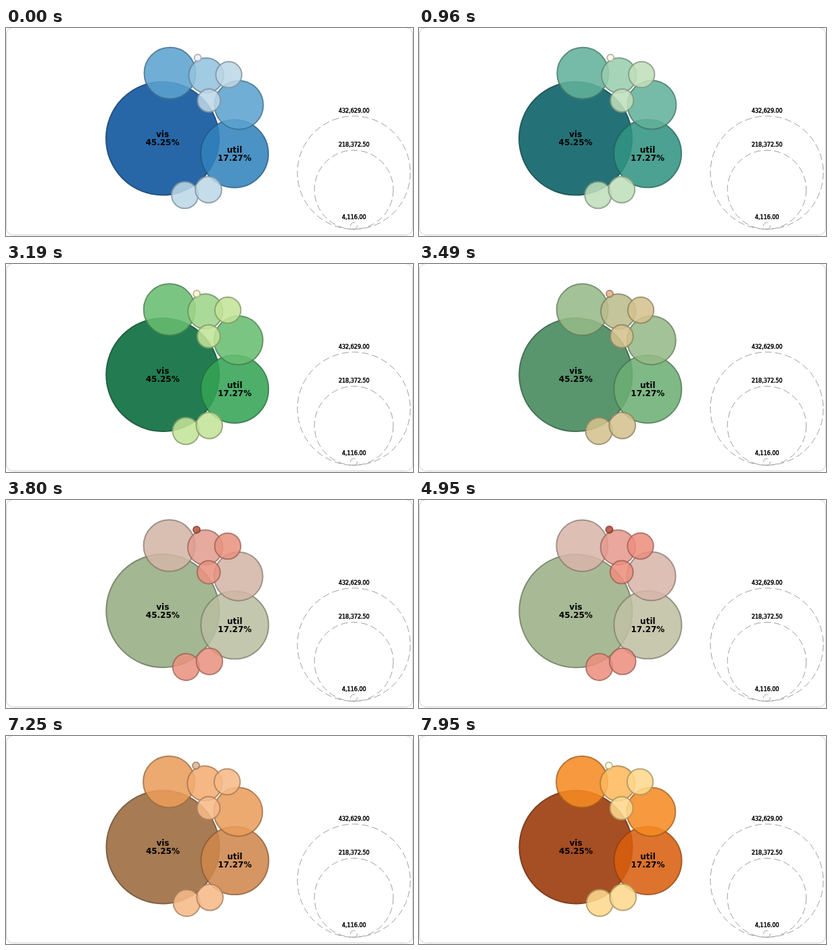
Write an HTML page that moves like this. It is 602 by 307 pixels and loops after 8000 ms.

```html
<!DOCTYPE html>
<html lang="en">
<head>
<meta charset="utf-8">
<title>Bubble chart palettes</title>
<style>
  html, body { margin: 0; width: 100%; height: 100%; overflow: hidden; background: #fff; }
  svg { display: block; width: 602px; height: 307px; }
  text { font-family: "DejaVu Sans", sans-serif; text-anchor: middle; fill: #000; }
  .frame { fill: #fff; stroke: #ccc; }
  .bubble { opacity: .87; stroke-width: 2; }
  .label { font-size: 12px; font-weight: bold; }
  .legend circle { fill: none; stroke: #9a9ea6; stroke-dasharray: 10 5; }
  .legend text { font-size: 8px; stroke: #000; stroke-width: .5; }
</style>
</head>
<body>
<svg viewBox="0 0 602 307">
  <rect class="frame" x=".5" y="-.5" width="601" height="306" rx="10"/>
  <g id="bubbles"></g>
  <g id="labels"></g>
  <g id="legend" class="legend"></g>
</svg>
<script>
const LOOP = 8000, DRIFT_START = 500, TICK = 76.7, FADE = 1000;

// Each palette runs from the largest bubble's shade to the smallest's.
const parse = hex => [0, 2, 4].map(i => parseInt(hex.slice(i, i + 2), 16));
const palette = list => list.split(' ').map(parse);
const blues = palette('08519c 3182bd 5ca3d0 94c3df bdd7e7 eff3ff');
const fades = [
  { start: 440, colors: palette('006837 31a354 66bd70 9dd689 c2e699 ffffcc') },
  { start: 3020, colors: palette('9cb086 c0c0a4 d8b6aa e69b90 ec8f7f b84d38') },
  { start: 6720, colors: palette('993404 d95f0e f68b22 feb95c fed98e ffffd4') }
];

// Start and end centre, radius, palette slot, label lines.
const bubbles = [
  { from: [231.5, 163], to: [232, 164], r: 83.5, shade: 0, lines: ['vis', '45.25%'] },
  { from: [338, 185.5], to: [338.5, 184], r: 50, shade: 1, lines: ['util', '17.27%'] },
  { from: [242.5, 66.7], to: [241, 67.7], r: 38, shade: 2 },
  { from: [344.5, 113.7], to: [343.3, 112], r: 36, shade: 2 },
  { from: [296, 70], to: [293.8, 70], r: 25.7, shade: 3 },
  { from: [329.5, 69], to: [327, 67.6], r: 19.2, shade: 4 },
  { from: [300.3, 107], to: [299.5, 106.4], r: 17, shade: 4 },
  { from: [264.6, 246.6], to: [267.4, 246.4], r: 19.7, shade: 4 },
  { from: [299.5, 238.7], to: [301.7, 238], r: 19.4, shade: 4 },
  { from: [283.6, 44], to: [280.9, 43.8], r: 5, shade: 5 }
];
const legend = [[83.5, '432,629.00'], [58.3, '218,372.50'], [5, '4,116.00']];

function add(parent, tag, attrs, text = '') {
  const node = document.createElementNS('http://www.w3.org/2000/svg', tag);
  setAttrs(node, attrs);
  node.textContent = text;
  return document.getElementById(parent).appendChild(node);
}
function setAttrs(node, attrs) {
  for (const key in attrs) node.setAttribute(key, attrs[key]);
}

for (const [r, text] of legend) {
  add('legend', 'circle', { cx: 514.5, cy: 297 - r, r });
  add('legend', 'text', { x: 514.8, y: 292 - 2 * r }, text);
}
for (const b of bubbles) {
  b.circle = add('bubbles', 'circle', { class: 'bubble', r: b.r });
  b.texts = (b.lines || []).map(line => add('labels', 'text', { class: 'label' }, line));
}

const clamp = x => Math.min(1, Math.max(0, x));
const cubicInOut = x => x < .5 ? 4 * x ** 3 : 1 - 4 * (1 - x) ** 3;
const mix = (a, b, k) => a.map((v, i) => v + (b[i] - v) * k);
const rgb = (color, k = 1) => `rgb(${color.map(v => Math.round(v * k))})`;
const settle = seconds => 1 - Math.exp(-.2 * seconds);

function draw(time) {
  // The picture advances in even ticks after an initial pause.
  const tick = Math.floor((time - DRIFT_START + 5) / TICK);
  const t = tick < 0 ? 0 : DRIFT_START + tick * TICK;
  const drift = settle(Math.max(0, t - DRIFT_START) / 1000) / settle(7.45);

  const colors = fades.reduce((current, fade) => {
    const k = cubicInOut(clamp((t - fade.start) / FADE));
    return current.map((c, i) => mix(c, fade.colors[i], k));
  }, blues);

  for (const b of bubbles) {
    const [x, y] = mix(b.from, b.to, drift), color = colors[b.shade];
    setAttrs(b.circle, { cx: x, cy: y, fill: rgb(color), stroke: rgb(color, .7) });
    b.texts.forEach((text, i) => setAttrs(text, { x, y: y - 1.7 + 12 * i }));
  }
}

function play(now) {
  draw(now % LOOP);
  requestAnimationFrame(play);
}
draw(0);
requestAnimationFrame(play);
</script>
</body>
</html>
```
